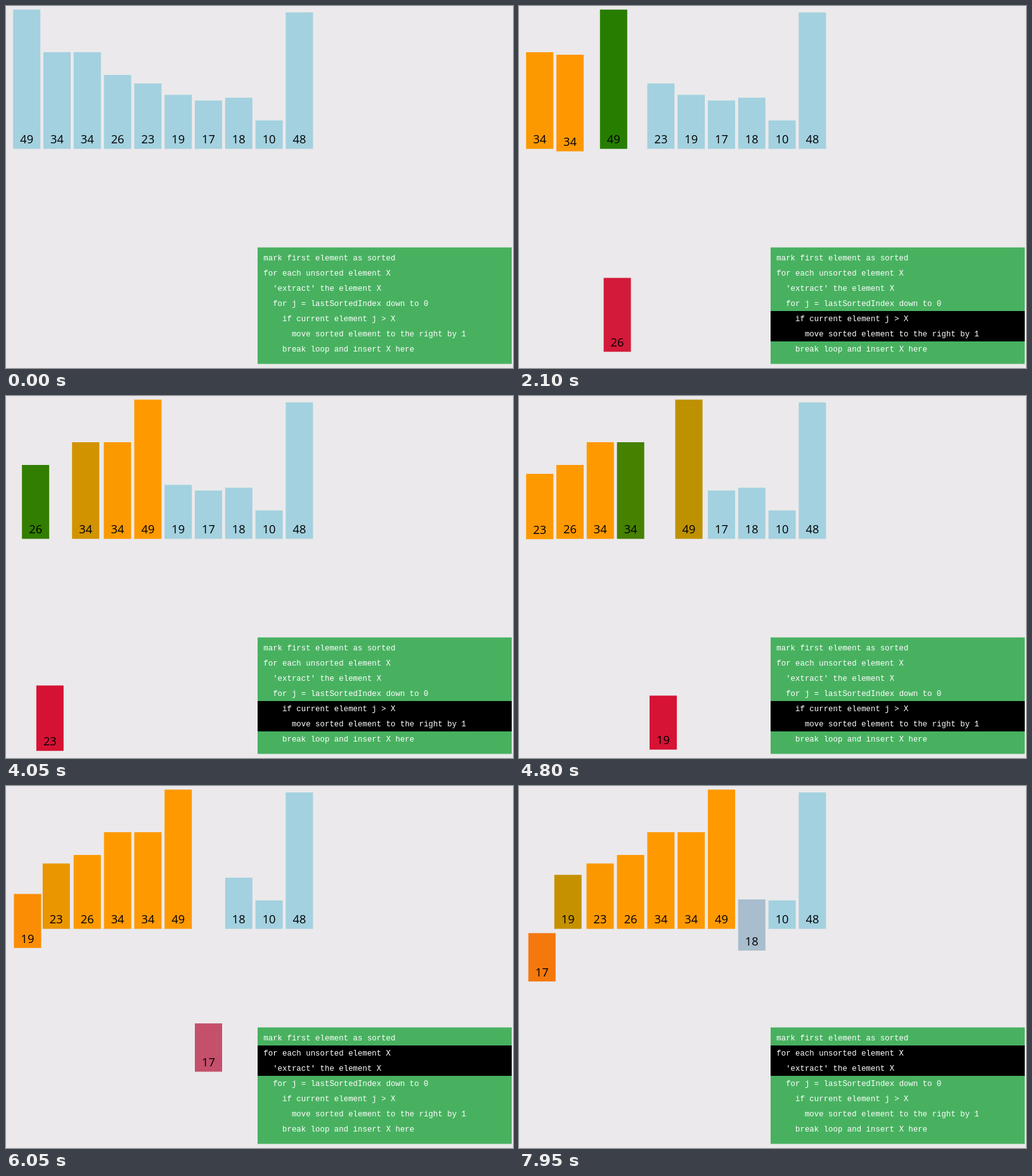
An HTML page for the animation above (8000 ms loop, 800 by 572 pixels).

```html
<!DOCTYPE html>
<html lang="en">
<head>
<meta charset="utf-8">
<title>Insertion sort</title>
<style>
  html, body { margin: 0; width: 100%; height: 100%; overflow: hidden; background: #ebe9eb; }
  svg { display: block; width: 100vw; height: 100vh; }
  .num { font: 18.3px "Open Sans", sans-serif; text-anchor: middle; }
  .code { font: 12.4px "Liberation Mono", monospace; fill: #fff; white-space: pre; }
</style>
</head>
<body>
<svg id="stage" viewBox="0 0 800 572"></svg>
<script>
const LOOP = 8000, TICK = 50;
const FIRST = 302, STEP = 140.33, TWEEN = 238; // each step cuts off the previous tween
const LEFT = 11.2, PITCH = 47.8, WIDTH = 43, BASE = 225.7, DROP = 335, UNIT = 4.49;
const BLUE = [163, 209, 223], ORANGE = [255, 153, 0], GREEN = [0, 120, 0], RED = [214, 18, 52];
const values = [49, 34, 34, 26, 23, 19, 17, 18, 10, 48];
const code = [
  "mark first element as sorted",
  "for each unsorted element X",
  "  'extract' the element X",
  "  for j = lastSortedIndex down to 0",
  "    if current element j > X",
  "      move sorted element to the right by 1",
  "    break loop and insert X here"
];

const stage = document.getElementById("stage");

function add(parent, tag, attrs, text) {
  const el = document.createElementNS("http://www.w3.org/2000/svg", tag);
  for (const k in attrs) el.setAttribute(k, attrs[k]);
  if (text) el.textContent = text;
  parent.appendChild(el);
  return el;
}

const ease = p => p < 0.5 ? 4 * p ** 3 : 1 - 4 * (1 - p) ** 3;
const progress = ms => ease(Math.min(1, Math.max(0, ms / TWEEN)));
const mix = (a, b, p) => a.map((row, i) => row.map((v, k) => v + (b[i][k] - v) * p));

// Run the sort once and record the pose each step moves to
function record() {
  const bars = values.map((value, slot) => ({ value, slot, drop: 0, color: BLUE }));
  const order = bars.slice();
  const pose = () => bars.map(b => [LEFT + PITCH * b.slot, BASE + b.drop, ...b.color]);
  const steps = [];
  let from = pose();
  const push = (first, last = first) => {
    const to = pose();
    steps.push({ from, to, first, last });
    from = mix(from, to, progress(STEP));
  };

  bars[0].color = ORANGE;
  push(1);
  for (let i = 1; i < bars.length; i++) {
    const x = order[i];
    x.drop = DROP;
    x.color = RED;
    push(2, 3);
    for (let j = i - 1; j >= 0; j--) {
      const cur = order[j];
      cur.color = GREEN;
      push(4);
      const shift = cur.value > x.value;
      if (shift) {
        order[j] = x;
        order[j + 1] = cur;
        x.slot = j;
        cur.slot = j + 1;
        push(5, 6);
      }
      cur.color = ORANGE;
      if (!shift) break;
    }
    x.drop = 0;
    x.color = ORANGE;
    push(7);
  }
  return steps;
}

const steps = record();

add(stage, "rect", { x: 397, y: 381.5, width: 401, height: 184, fill: "#48b160" });
const mark = add(stage, "rect", { x: 397, width: 401, fill: "#000" });
code.forEach((line, i) => {
  const indent = line.search(/\S/);
  add(stage, "text", { class: "code", x: 406.3 + indent * 7.44, y: 402 + 24 * i }, line.trim());
});

const nodes = values.map(v => {
  const g = add(stage, "g", {});
  const h = v * UNIT;
  const rect = add(g, "rect", { y: -h, width: WIDTH, height: h });
  add(g, "text", { class: "num", x: WIDTH / 2, y: -8.3 }, String(v));
  return { g, rect };
});

function draw(t) {
  const n = Math.min(steps.length - 1, Math.floor((t - FIRST) / STEP));
  const step = steps[Math.max(0, n)];
  const pose = n < 0 ? step.from : mix(step.from, step.to, progress(t - FIRST - n * STEP));
  pose.forEach(([x, y, ...rgb], i) => {
    nodes[i].g.setAttribute("transform", `translate(${x.toFixed(2)} ${y.toFixed(2)})`);
    nodes[i].rect.setAttribute("fill", `rgb(${rgb.map(Math.round)})`);
  });
  mark.setAttribute("y", 362 + 24 * step.first);
  mark.setAttribute("height", n < 0 ? 0 : 24 * (step.last - step.first + 1));
}

const start = performance.now();
function frame() {
  const t = (performance.now() - start) % LOOP;
  draw(Math.floor(t / TICK) * TICK);
  requestAnimationFrame(frame);
}
frame();
</script>
</body>
</html>
```
